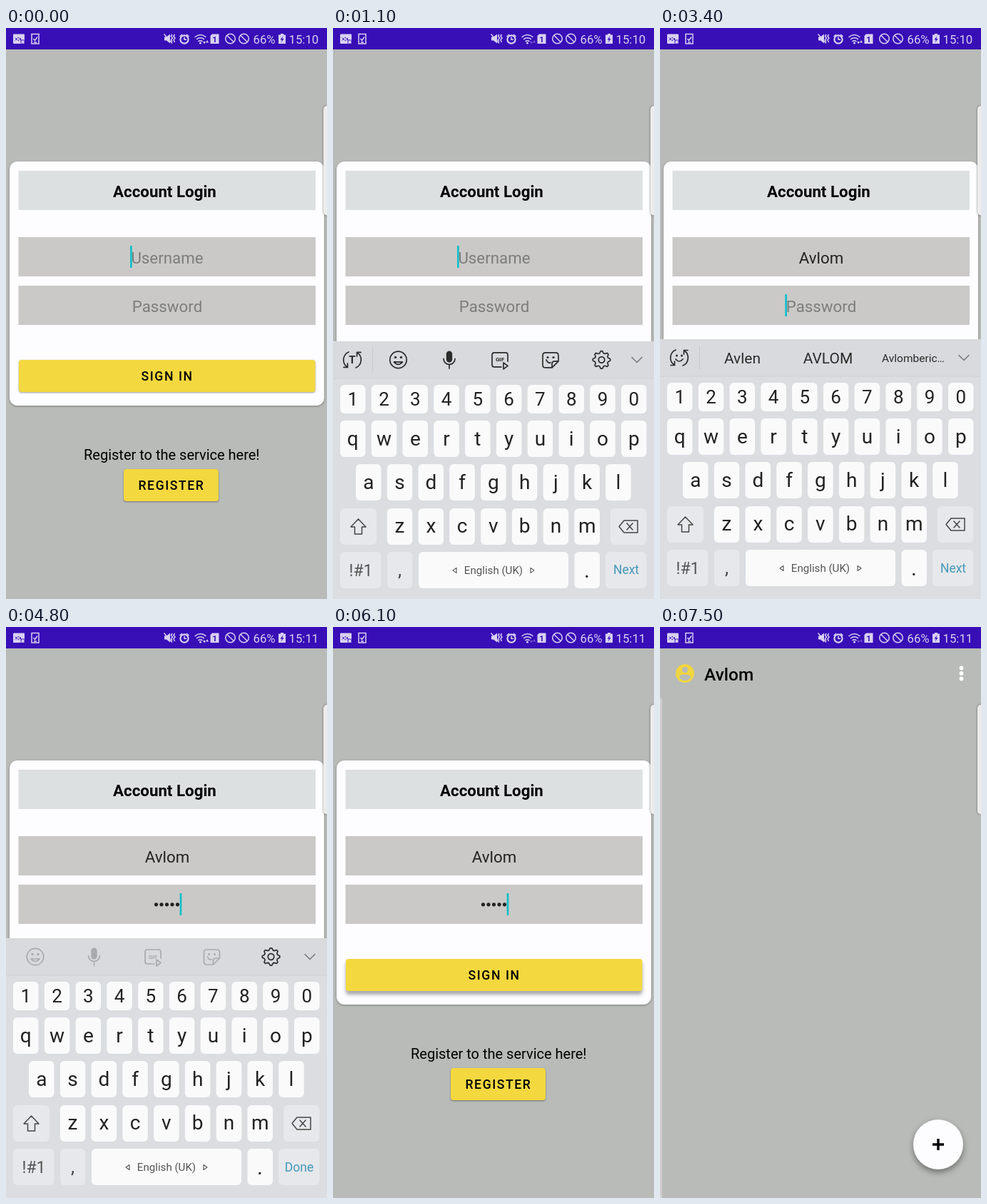
Animation of 450 by 800 pixels, one loop 8.3 s. Source, as an HTML page:

```html
<!DOCTYPE html>
<html lang="en">
<head>
<meta charset="utf-8">
<title>Account login</title>
<style>
html, body { margin: 0; height: 100%; overflow: hidden; background: #b9bbb8; }
svg { display: block; width: 100vw; height: 100vh; font-family: Roboto, sans-serif; }
text { white-space: pre; }
.mid { text-anchor: middle; }
.hint { fill: #7d7d7d; font-size: 22.3px; }
.entry { fill: #222; font-size: 22.3px; }
.cursor { fill: #12bfc8; }
.box { fill: #cac9c8; }
.button { fill: #f3d83f; filter: drop-shadow(0 1.5px 1.3px #0006); }
.button.raised { filter: drop-shadow(0 5px 2.5px #0005); }
.label { font-size: 17.6px; font-weight: 500; letter-spacing: 1.6px; }
.key { fill: #fafafb; }
.fn { fill: #e6e8eb; }
.key.down { fill: #c6c9ce; }
.line { fill: none; stroke: #2b2b2b; stroke-width: 1.7; stroke-linecap: round; stroke-linejoin: round; }
.ink { fill: #2b2b2b; }
.faded { opacity: .27; }
.word { fill: #2b2b2b; font-size: 21px; }
.st { fill: none; stroke: #d9d0f2; stroke-width: 1.5; }
.sf { fill: #d9d0f2; }
</style>
</head>
<body>
<svg viewBox="0 0 450 800" preserveAspectRatio="none">
  <defs>
    <g id="smile">
      <circle class="line" r="11.7"/>
      <circle class="ink" cx="-4" cy="-3.5" r="1.7"/><circle class="ink" cx="4" cy="-3.5" r="1.7"/>
      <path class="line" d="M-6 3Q0 10 6 3Z"/>
    </g>
    <g id="mic">
      <rect class="ink" x="-4.2" y="-12.5" width="8.4" height="16" rx="4.2"/>
      <path class="line" d="M-8-1.5A8 8 0 0 0 8-1.5M0 7V12"/>
    </g>
    <g id="gif">
      <path class="line" d="M2 10H-8Q-11 10-11 7V-7Q-11-10-8-10H8Q11-10 11-7V2M5 4L11 8.5L5 13Z"/>
      <text class="ink mid" y="2.5" font-size="8" font-weight="700">GIF</text>
    </g>
    <g id="sticker">
      <path class="line" d="M2 11H-7Q-11 11-11 7V-6Q-11-10-7-10H7Q11-10 11-6V2L2 11V6Q2 2 6 2H11M-6 0Q-4 5 0 4"/>
      <circle class="ink" cx="-4" cy="-3.5" r="1.5"/><circle class="ink" cx="4" cy="-3.5" r="1.5"/>
    </g>
    <g id="gear"><path id="teeth" class="line"/><circle class="line" r="4.3"/></g>
    <g id="turn">
      <path class="line" d="M-5-11A12 12 0 0 0-7 10M-12 10.5H-6.5V5M5 11A12 12 0 0 0 7-10M12-10.5H6.5V-5"/>
    </g>
    <g id="ban"><circle class="st" r="6.8"/><path class="st" d="M-4.8-4.8L4.8 4.8"/></g>
  </defs>

  <g id="login">
    <rect width="450" height="800" fill="#b9bbb8"/>
    <rect x="5" y="187" width="441" height="342" rx="11" fill="#fdfcfe" style="filter:drop-shadow(0 1px 1.5px #0005)"/>
    <rect x="17.5" y="200" width="416.5" height="55" fill="#dce0e0"/>
    <text x="150" y="237" font-size="22.3" font-weight="700">Account Login</text>
    <rect class="box" x="17.5" y="293" width="416.5" height="55"/>
    <rect class="box" x="17.5" y="361" width="416.5" height="55"/>
    <text class="hint mid" id="userHint" x="226" y="329.5">Username</text>
    <text class="hint mid" id="passHint" x="226" y="397.5">Password</text>
    <text class="entry mid" id="user" x="226" y="329.5"></text>
    <rect id="underline" y="331.5" height="1.4" fill="#222"/>
    <g id="dots" fill="#222"></g>
    <rect class="cursor" id="cursor" width="2.7" height="31"/>
    <rect class="button" id="signIn" x="18" y="465" width="415.5" height="45" rx="4"/>
    <text class="label" x="189.5" y="494">SIGN IN</text>
    <text x="109" y="605" font-size="20">Register to the service here!</text>
    <rect class="button" x="165" y="618" width="133" height="45" rx="4"/>
    <text class="label" x="185.5" y="647">REGISTER</text>
  </g>

  <g id="keyboard">
    <rect y="436" width="450" height="364" fill="#dbdde1"/>
    <rect y="436" width="450" height="52" fill="#d8dadd"/>
    <rect y="487.5" width="450" height="1" fill="#cfd1d4"/>
    <g id="tools">
      <use href="#turn" x="27" y="462"/>
      <text class="ink mid" x="27" y="467.5" font-size="15" font-weight="700">T</text>
      <use href="#smile" x="91.5" y="462"/><use href="#mic" x="163" y="462"/>
      <use href="#gif" x="234" y="462"/><use href="#sticker" x="305" y="462"/>
      <use href="#gear" x="376.5" y="462"/>
    </g>
    <g id="words">
      <use href="#turn" x="27" y="462"/>
      <circle class="ink" cx="23.5" cy="459" r="1.5"/><circle class="ink" cx="30.5" cy="459" r="1.5"/>
      <path class="line" d="M22 464Q27 470 32 464"/>
      <text class="word mid" x="115.5" y="470">Avlen</text>
      <text class="word mid" x="235.5" y="470">AVLOM</text>
      <text class="word mid" x="355" y="468" style="font-size:15.5px">Avlomberic…</text>
    </g>
    <rect id="divider" x="55" y="446" width="1" height="32" fill="#c5c7ca"/>
    <g id="secure">
      <g class="faded">
        <use href="#smile" x="41" y="462"/><use href="#mic" x="123.5" y="462"/>
        <use href="#gif" x="206" y="462"/><use href="#sticker" x="288.5" y="462"/>
      </g>
      <use href="#gear" x="371.5" y="462"/>
    </g>
    <path class="line" d="M419 458.5L426 465.5L433 458.5" style="stroke:#777;stroke-width:1.5"/>
    <g id="keys"></g>
    <path class="line" d="M35.5 685L46 696H40.5V706H30.5V696H25Z" style="stroke:#444;stroke-width:1.5"/>
    <path class="line" d="M401 695.5L408 687H427V704H408ZM412 691L420 700M420 691L412 700" style="stroke:#444;stroke-width:1.5"/>
    <path class="line" d="M173 753.5V760.5L168 757ZM277 753.5V760.5L282 757Z" style="stroke:#555;stroke-width:1.1"/>
  </g>

  <g id="home">
    <rect width="450" height="800" fill="#b9bbb8"/>
    <rect y="100" width="2.7" height="700" fill="#d3d0d0"/>
    <circle cx="35" cy="65" r="13" fill="#f0d541"/>
    <circle cx="35" cy="60" r="4" fill="#b9bbb8"/>
    <path d="M27 70.5Q27 66.5 35 66.5T43 70.5Q40 75 35 75T27 70.5Z" fill="#b9bbb8"/>
    <text x="62" y="74.5" font-size="24.5" font-weight="500">Avlom</text>
    <g fill="#fff"><circle cx="422.5" cy="57.5" r="2.9"/><circle cx="422.5" cy="65" r="2.9"/><circle cx="422.5" cy="72.5" r="2.9"/></g>
    <circle cx="390" cy="725" r="35" fill="#fdfcfe" style="filter:drop-shadow(0 4px 4px #0006)"/>
    <path d="M382 725H398M390 717V733" stroke="#000" stroke-width="3.4"/>
  </g>

  <rect x="445" y="109" width="12" height="153.5" rx="5" fill="#ececec" style="filter:drop-shadow(0 0 1.5px #0007)"/>

  <g id="status">
    <rect width="450" height="30" fill="#380eb6"/>
    <path class="sf" fill-rule="evenodd" d="M11 8.5H25Q26 8.5 26 9.5V21Q26 22 25 22H11Q10 22 10 21V9.5Q10 8.5 11 8.5ZM12 13V18H21V13Z"/>
    <circle class="st" cx="14.5" cy="15.5" r="2"/><circle class="st" cx="20" cy="15.5" r="2"/>
    <rect x="20.5" y="16.5" width="5" height="5" fill="#380eb6"/><rect class="sf" x="21.5" y="17.5" width="3.5" height="4"/>
    <path class="st" d="M36 8.5H46V22H36ZM38.5 15L40.5 17.5L44 12.5M39 20H43"/>
    <path class="sf" d="M222 12.5H225L230 8.5V21.5L225 17.5H222Z"/>
    <path class="st" d="M221.5 8.5L233 21.5M233 9L231.5 11.5L233.5 14L231.5 16.5L233 19M236.5 9L235 11.5L237 14L235 16.5L236.5 20"/>
    <circle cx="250" cy="16" r="5.6" fill="none" stroke="#d9d0f2" stroke-width="2.2"/>
    <path class="st" d="M250 12.5V16.2H253M243.5 12L247 9M256.5 12L253 9"/>
    <path class="st" d="M264.5 13Q272.5 6 280.5 13M267 16Q272.5 11.5 278 16M269.5 18.8Q272.5 16.5 275.5 18.8"/>
    <circle class="sf" cx="272.5" cy="21" r="1.5"/>
    <path class="sf" id="traffic" d="M276.2 19H280L278.1 22.5ZM280.2 20.5H284L282.1 17Z"/>
    <path class="sf" d="M289 8.5H298.5V22H286.5V11Z"/>
    <text class="mid" x="292.5" y="19.5" font-size="11.5" font-weight="700" fill="#380eb6">1</text>
    <use href="#ban" x="314.5" y="15"/><use href="#ban" x="333.5" y="15"/>
    <text class="sf" x="346.5" y="21.8" font-size="16.8">66%</text>
    <path class="sf" d="M385 8H389V9.5H392V22H382V9.5H385Z"/>
    <path d="M388.5 11L384.5 16.5H387L385.5 20.5L389.7 15H387.2Z" fill="#380eb6"/>
    <text class="sf" id="clock" x="396.5" y="21.8" font-size="16.8"></text>
  </g>
</svg>

<script>
const LOOP = 8300, STEP = 100, NAME = "Avlom";
const $ = id => document.getElementById(id);
const keys = {};

function add(parent, tag, attrs, text = "") {
  const el = document.createElementNS("http://www.w3.org/2000/svg", tag);
  for (const k in attrs) el.setAttribute(k, attrs[k]);
  el.textContent = text;
  parent.append(el);
  return el;
}

function addKey(id, x, y, w, h, fn = false) {
  keys[id] = add($("keys"), "rect", { class: fn ? "key fn" : "key", x, y, width: w, height: h, rx: 6 });
}

function addLabel(text, x, y, size, fill = "#222") {
  return add($("keys"), "text", { class: "mid", x, y, "font-size": size, fill }, text);
}

// Letter rows: characters, left edge, top, height, baseline, size
const PITCH = 43.78;
const letters = [];
for (const [chars, left, top, h, base, size] of [
  ["1234567890", 10, 497, 40, 526, 26],
  ["qwertyuiop", 10, 547, 51, 582, 28],
  ["asdfghjkl", 32, 608, 51, 643, 28],
  ["zxcvbnm", 75.8, 670, 51, 704, 28]
]) {
  [...chars].forEach((c, i) => {
    const x = left + i * PITCH;
    addKey(c, x, top, 35.5, h);
    letters.push([c, addLabel(c, x + 17.75, base, size)]);
  });
}
addKey("shift", 10, 670, 51, 51, true);
addKey("delete", 389, 670, 50.5, 51, true);
addKey("symbols", 10, 731, 57.5, 51, true);
addKey("comma", 76, 731, 35.5, 51, true);
addKey("space", 120, 731, 210, 51);
addKey("dot", 338.5, 731, 35.5, 51);
addKey("enter", 382, 731, 57.5, 51, true);
addLabel("!#1", 39, 765, 23, "#555");
addLabel(",", 93.5, 765, 26, "#444");
addLabel("English (UK)", 225, 762, 15.1, "#555");
addLabel(".", 356, 767, 30);
const enter = addLabel("", 411, 762.5, 17.5, "#4598b8");

const teeth = Array.from({ length: 32 }, (_, i) => {
  const r = i % 4 < 2 ? 12.3 : 9.5, a = (i - .5) * Math.PI / 16;
  return (r * Math.cos(a)).toFixed(1) + "," + (r * Math.sin(a)).toFixed(1);
});
$("teeth").setAttribute("d", "M" + teeth.join("L") + "Z");

const dots = Array.from({ length: 5 }, () => add($("dots"), "circle", { cy: 388.8, r: 2.6 }));

const USER_TIMES = [2000, 2300, 2400, 2500, 2600];
const PASS_TIMES = [4000, 4200, 4300, 4500, 4800];
const PRESSES = [
  ["shift", 1600, 1700], ["a", 1900, 2000], ["v", 2200, 2300], ["l", 2300, 2400],
  ["o", 2400, 2500], ["m", 2500, 2600], ["m", 4600, 4800], ["enter", 5100, 5200]
];
const BLANKS = [[400, 900], [1400, 1900], [3100, 3400], [3900, 4000], [5300, 5800]];
const QUIET = [[700, 1900], [6000, 6800], [7500, LOOP]];

const within = (t, spans) => spans.some(([a, b]) => t >= a && t < b);
const count = (t, times) => times.filter(x => t >= x).length;
const part = (t, a, b) => Math.min(1, Math.max(0, (t - a) / (b - a)));
const easeOut = p => 1 - (1 - p) ** 3;
const show = (el, on) => { el.style.display = on ? "" : "none"; };
const shift = (el, x, y) => el.setAttribute("transform", `translate(${x} ${y})`);

function drawFields(t) {
  const typed = count(t, USER_TIMES), hidden = count(t, PASS_TIMES), onPass = t >= 3400;
  $("user").textContent = NAME.slice(0, typed);
  show($("userHint"), !typed);
  show($("passHint"), !hidden);
  const w = typed ? $("user").getComputedTextLength() : 0;
  show($("underline"), typed && !onPass);
  $("underline").setAttribute("x", 226 - w / 2);
  $("underline").setAttribute("width", w);
  dots.forEach((d, i) => {
    show(d, i < hidden);
    d.setAttribute("cx", 225.5 + (i - (hidden - 1) / 2) * 7.5);
  });
  let x = typed ? 225.8 + w / 2 : 174;
  if (onPass) x = hidden ? 224.9 + hidden * 3.75 : 175.3;
  $("cursor").setAttribute("x", x);
  $("cursor").setAttribute("y", onPass ? 373 : 305);
  show($("cursor"), !within(t, BLANKS));
  $("signIn").classList.toggle("raised", t >= 6000);
}

function drawKeyboard(t) {
  const up = easeOut(part(t, 700, 1200)), down = part(t, 5000, 5400) ** 2;
  shift($("keyboard"), 0, 364 * (1 - up + down));
  show($("keyboard"), t > 700 && t < 5400);
  const caps = t >= 1700 && t < 2100;
  for (const [c, el] of letters) el.textContent = caps ? c.toUpperCase() : c;
  for (const id in keys) keys[id].classList.remove("down");
  for (const [id, a, b] of PRESSES) if (t >= a && t < b) keys[id].classList.add("down");
  show($("tools"), t < 2300);
  show($("words"), t >= 2300 && t < 3600);
  show($("secure"), t >= 3600);
  show($("divider"), t < 3600);
  enter.textContent = t < 3600 ? "Next" : "Done";
}

function draw(t) {
  drawFields(t);
  drawKeyboard(t);
  const slide = easeOut(part(t, 6200, 6700));
  shift($("login"), -112 * slide, 0);
  shift($("home"), 450 * (1 - slide), 0);
  show($("home"), slide > 0);
  $("traffic").style.opacity = within(t, QUIET) ? .4 : 1;
  $("clock").textContent = t < 3700 ? "15:10" : "15:11";
}

const start = performance.now();
let last = -1;
function tick() {
  const t = Math.floor((performance.now() - start) % LOOP / STEP) * STEP;
  if (t !== last) draw(last = t);
  requestAnimationFrame(tick);
}
tick();
</script>
</body>
</html>
```
